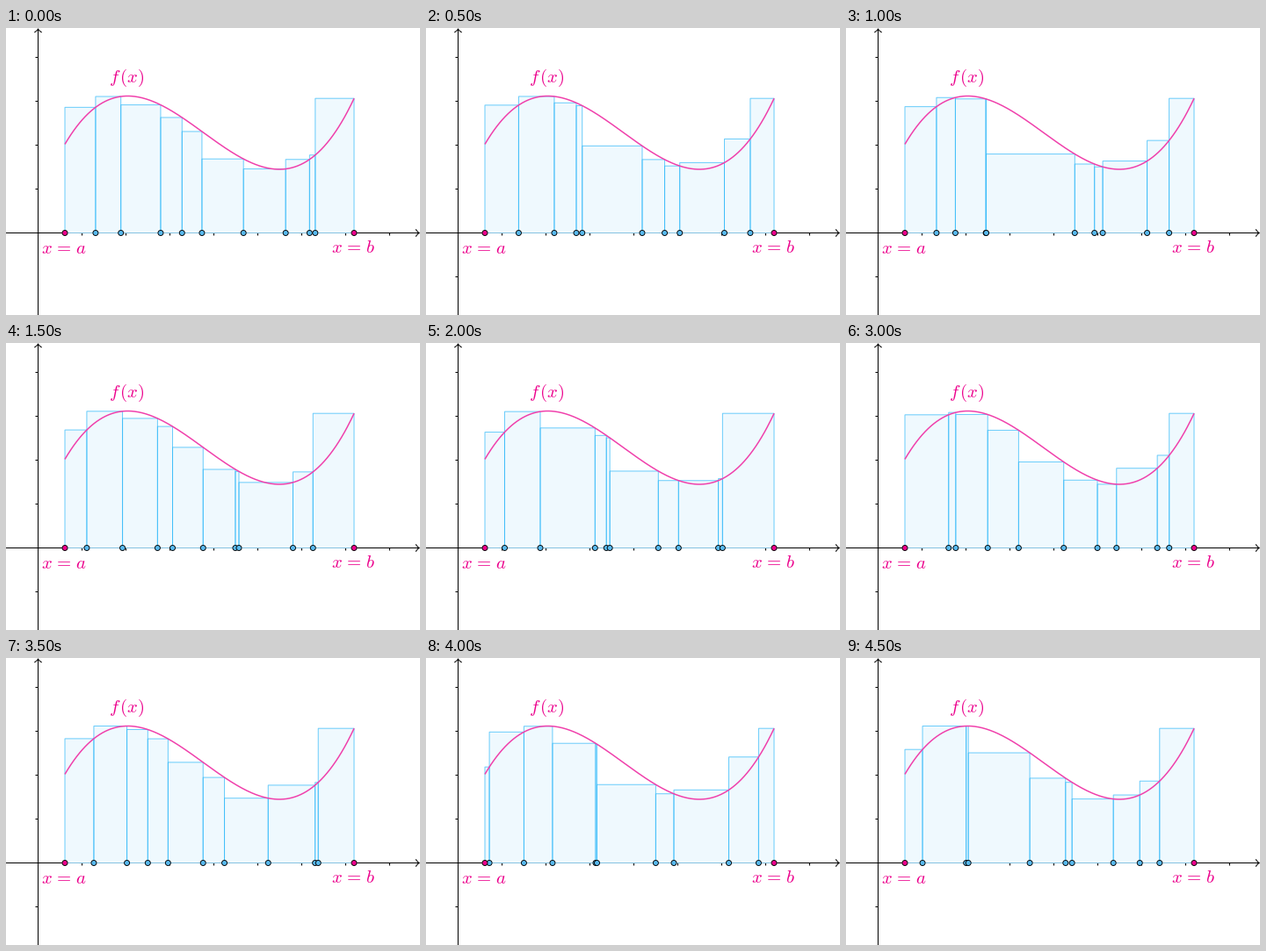
A matplotlib script for the animation above (5000 ms loop, 471x327 px).

```python
import numpy as np
import matplotlib.pyplot as plt
from matplotlib.animation import FuncAnimation
from matplotlib.patches import Circle, Rectangle

W, H, DPI = 471, 327, 64
PT = 72 / DPI  # points per pixel
OX, OY = 36.5, 233.5  # origin of the plot
A, B = 67.0, 396.0
BARS, FRAMES = 10, 10
PINK, BLUE, BLACK = "#ec008c", "#58b9ee", "#000000"
SKY = (0.2, 0.73, 0.98)


def f(x):
    """Cubic with its maximum near x=138 and its minimum near x=311."""
    u = (x - 224.75) / 86.25
    return 119.25 + 41.75 * (3 * u - u**3) / 2


def partition(i):
    """Even steps from A to B with every inner point shaken at random."""
    rng = np.random.default_rng(i)
    edges = np.linspace(A, B, BARS + 1)
    shaken = edges[1:-1] + rng.normal(0, 16, BARS - 1)
    edges[1:-1] = np.sort(np.clip(shaken, A + 3, B - 3))
    return edges


plt.rcParams["mathtext.fontset"] = "cm"
plt.rcParams["path.snap"] = False
fig = plt.figure(figsize=(W / DPI, H / DPI), dpi=DPI, facecolor="white")
ax = fig.add_axes([0, 0, 1, 1])
ax.set_xlim(0, W)
ax.set_ylim(H, 0)
ax.axis("off")


def line(x, y, color=BLACK, width=1.0, z=1):
    return ax.plot(x, y, color=color, lw=width * PT, zorder=z,
                   solid_capstyle="butt", solid_joinstyle="round")[0]


def dot(x, color, z):
    return ax.add_patch(Circle((x, OY), 3.0, fc=color, ec=BLACK,
                               lw=0.9 * PT, zorder=z))


def label(x, y, text):
    ax.text(x, y, text, color=PINK, fontsize=20.74 * PT,
            ha="center", va="baseline", zorder=6)


# Axes with open arrow tips
line([0, 470], [OY, OY])
line([OX, OX], [H, 1])
t = np.linspace(-1, 1, 41)
back = 4.2 * np.abs(t) ** 0.7
line(470.3 - back, OY + 4.2 * t)
line(OX + 4.2 * t, 0.9 + back)

for k in range(1, 9):
    line([OX + 50 * k] * 2, [OY, OY + 3])
for k in range(1, 5):
    line([OX - 3, OX], [OY - 50 * k] * 2)
low_tick = line([OX - 3, OX], [OY + 50] * 2)

bars = [ax.add_patch(Rectangle((A, OY), 1, 1, fc=SKY + (0.075,),
                               ec=SKY + (0.72,), lw=PT, zorder=2))
        for _ in range(BARS)]
line([A, B], [OY, OY], "#86c2e0", z=3)

xs = np.linspace(A, B, 300)
line(xs, f(xs), "#f03fab", 1.5, 4)

dots = [dot(A, BLUE, 5) for _ in range(BARS - 1)]
dot(A, PINK, 5.5)
dot(B, PINK, 5.5)

label(136.9, 61.7, r"$f\hspace{0.14}(x)$")
label(66.4, 257.2, r"$x\hspace{0.12}=\hspace{0.12}a$")
label(395.0, 256.1, r"$x\hspace{0.12}=\hspace{0.12}b$")


def draw(i):
    edges = partition(i)
    for bar, left, right in zip(bars, edges, edges[1:]):
        top = f(right)  # right endpoint sets the height
        bar.set_bounds(left, top, right - left, OY - top)
    for d, x in zip(dots, edges[1:-1]):
        d.center = (x, OY)
    low_tick.set_visible(i > 0)
    return [*bars, *dots, low_tick]


anim = FuncAnimation(fig, draw, frames=FRAMES, interval=500,
                     repeat=True, repeat_delay=0, blit=False)
plt.show()
```
